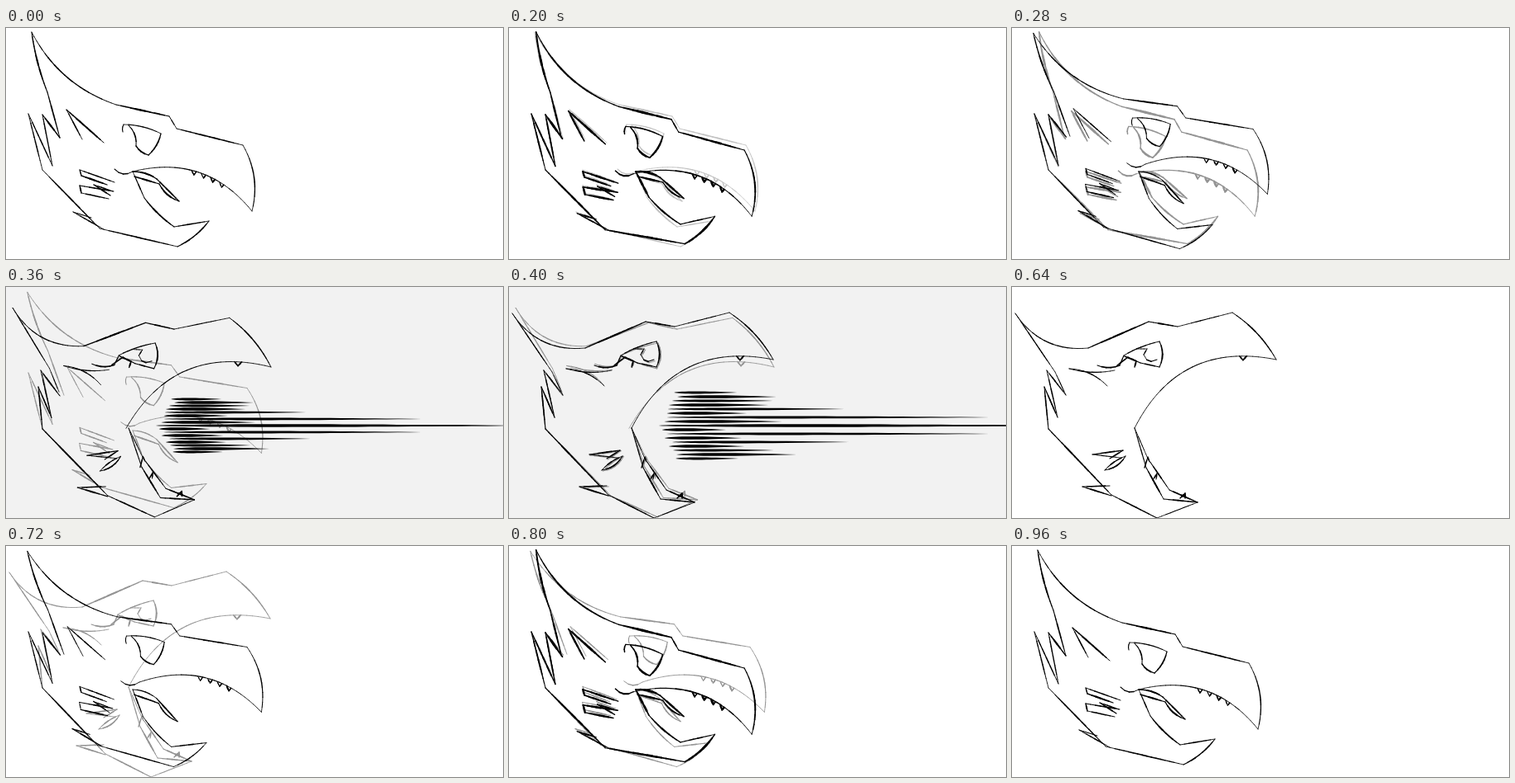
An HTML page with a canvas for the animation above (1.12 s loop, 600 px wide and 280 px high).

```html
<!DOCTYPE html>
<html lang="en">
<head>
<meta charset="utf-8">
<title>Beak beam</title>
<style>
html, body { margin: 0; height: 100%; overflow: hidden; background: #fff; }
canvas { display: block; }
</style>
</head>
<body>
<canvas id="stage" width="600" height="280"></canvas>
<script>
const ctx = document.getElementById('stage').getContext('2d');
const STEP = 40, LOOP = 1120, HUB = 168;

let seed = 1;
const rnd = () => (seed = seed * 16807 % 2147483647) / 2147483647;

// A head is made of chains of key points [x, y, bow of the line leading there].
const closed = {
  pivot: [45, 70], hinge: [153, 174], teeth: [.44, .52, .6, .68],
  upper: [
    [[153, 174], [297, 222, .16], [286, 142, -.1], [206, 122], [197, 107],
      [133, 93], [31, 5, .1], [50, 78, -.03], [65, 133]],
    [[141, 126], [142, 117, .1], [187, 128, .06], [172, 154, .08], [157, 143, .1], [148, 118, -.12]],
    [[131, 171], [153, 174, -.2]]
  ],
  jaw: [
    [[65, 133], [44, 105], [56, 167], [27, 104], [44, 172], [113, 243],
      [207, 265], [245, 234, -.06], [203, 241], [167, 206, .04], [153, 174]],
    [[153, 174], [182, 183, .08], [209, 210], [185, 189, .1], [155, 180]],
    [[118, 244], [81, 223], [103, 230]],
    [[92, 135], [73, 99], [118, 139]],
    [[131, 187], [89, 172], [91, 179], [122, 190]],
    [[130, 198], [89, 191], [91, 200], [124, 207]],
    [[126, 203], [106, 190], [129, 198]]
  ]
};

const open = {
  pivot: [140, 110], hinge: [148, 171], teeth: [.8],
  upper: [
    [[148, 171], [319, 88, .19], [266, 31, -.06], [200, 48], [165, 42],
      [92, 74], [4, 32, .15], [52, 103], [65, 131]],
    [[103, 95], [130, 95, -.1], [135, 83], [178, 66, .04], [178, 97, .12], [155, 92], [140, 85], [127, 95]],
    [[136, 84], [150, 90], [148, 97]],
    [[152, 75], [163, 75], [159, 82], [175, 88, -.3]],
    [[115, 120], [69, 99, -.1], [124, 101, -.06]]
  ],
  jaw: [
    [[65, 131], [42, 101], [55, 158], [39, 121], [44, 172], [120, 252],
      [175, 280], [224, 261], [183, 257], [162, 219], [148, 171]],
    [[148, 171], [164, 208], [190, 246], [224, 261]],
    [[160, 219], [164, 206], [166, 212]],
    [[170, 234], [175, 226], [174, 233]],
    [[203, 256], [209, 250], [209, 256]],
    [[118, 241], [85, 242], [120, 253]],
    [[118, 208], [134, 198], [97, 203], [131, 207]],
    [[137, 205], [112, 222, -.06], [137, 205, -.12]]
  ]
};

// Turns a chain about a point; a bending chain stays still at the neck.
const turn = (chain, [cx, cy], angle, bends) => chain.map(([x, y, bow = 0]) => {
  const a = bends ? angle * Math.max(0, Math.min(1, (x - 45) / 90)) : angle;
  const c = Math.cos(a), s = Math.sin(a);
  return [cx + (x - cx) * c - (y - cy) * s, cy + (x - cx) * s + (y - cy) * c, bow];
});

const curve = ([ax, ay], [bx, by, bow], t) => {
  const lift = 4 * bow * t * (1 - t);
  return [ax + (bx - ax) * t + (by - ay) * lift, ay + (by - ay) * t - (bx - ax) * lift];
};

function pose(head, upper, jaw, weight) {
  const chains = [
    ...head.upper.map(c => turn(c, head.pivot, upper)),
    ...head.jaw.map(c => turn(c, head.hinge, jaw, true))
  ];
  const [a, b] = chains[0];
  for (const t of head.teeth) {
    const tip = curve(a, b, t + .02);
    chains.push([curve(a, b, t), [tip[0], tip[1] + 5, 0], [...curve(a, b, t + .04), 0]]);
  }
  return { chains, weight };
}

const poses = {
  calm: pose(closed, 0, 0, 1.6),
  tense: pose(closed, .025, -.06, 2.2),
  middle: pose(closed, -.08, .05, 1.5),
  lean: pose(open, .05, -.04, 1.5),
  wide: pose(open, 0, 0, 1.5)
};

// Each drawing holds until the next and leaves a short fading trace.
const keys = [['calm', 0], ['tense', 3], ['middle', 7], ['lean', 9],
  ['wide', 10], ['middle', 18], ['tense', 20], ['calm', 21]];

function line(a, b, w) {
  const n = Math.max(3, Math.ceil(Math.hypot(b[0] - a[0], b[1] - a[1]) / 6));
  for (let i = 0; i < n; i++) {
    const taper = .5 + .5 * Math.sin(Math.PI * (i + .5) / n);
    ctx.lineWidth = Math.max(.8, w * taper * (.85 + .3 * rnd()));
    ctx.beginPath();
    ctx.moveTo(...curve(a, b, i / n));
    ctx.lineTo(...curve(a, b, (i + 1) / n));
    ctx.stroke();
  }
}

function drawHead(name, dark) {
  const { chains, weight } = poses[name];
  seed = 77;
  ctx.strokeStyle = `rgb(${Array(3).fill(Math.round(255 * (1 - dark)))})`;
  for (const chain of chains)
    for (let i = 1; i < chain.length; i++) line(chain[i - 1], chain[i], weight * (.7 + .6 * rnd()));
}

function streak(x, y, len, h) {
  ctx.beginPath();
  ctx.moveTo(x, y);
  ctx.bezierCurveTo(x + len * .1, y - h, x + len * .5, y - h, x + len, y);
  ctx.bezierCurveTo(x + len * .5, y + h, x + len * .1, y + h, x, y);
  ctx.fill();
}

// Long and short streaks alternate; the longest lie in the middle.
function blast(grow) {
  seed = 5;
  for (let i = -8; i <= 8; i++) {
    const d = i * 4, long = i % 2 === 0;
    const len = long ? 430 / (1 + (d / 13) ** 2) : 50 + 70 * rnd();
    streak(180 + Math.abs(d) * .6 + 8 * rnd(), HUB + d * grow, len * grow, long ? 1.9 : 2.4);
  }
  streak(180, HUB, 440, 2);
}

function cloud(x, y, len, spread, n) {
  seed = n;
  for (let i = 0; i < n; i++) {
    const off = (rnd() + rnd() - 1) * spread;
    streak(x + len * .35 * rnd(), y + off, len * (.35 + .3 * rnd()), 1.4);
  }
}

function afterglow(fade) {
  ctx.globalAlpha = fade;
  cloud(190, HUB, 140, 14, 45);
  cloud(246, 116, 105, 8, 16);
  cloud(224, 222, 80, 5, 12);
  streak(170, HUB - 3, 280, 2);
  ctx.globalAlpha = Math.min(1, fade * 3.4);
  streak(290, 116.5, 88, 1);
  const glow = ctx.createLinearGradient(168, 0, 345, 0);
  glow.addColorStop(0, '#999');
  glow.addColorStop(1, '#000');
  ctx.fillStyle = glow;
  ctx.fillRect(168, HUB - 1, 432, 2.6);
  ctx.globalAlpha = 1;
}

function draw(step) {
  const flash = step === 9 || step === 10;
  ctx.fillStyle = flash ? '#f2f2f2' : '#fff';
  ctx.fillRect(0, 0, 600, 280);
  ctx.lineCap = 'round';

  const now = keys.findLastIndex(k => k[1] <= step);
  const age = step - keys[now][1];
  if (now > 0 && age < 3) drawHead(keys[now - 1][0], .42 * .75 ** age);
  drawHead(keys[now][0], 1);

  ctx.fillStyle = '#000';
  if (flash) blast(step === 9 ? 1 : 1.25);
  else if (step > 10 && step < 15) afterglow(.55 * .55 ** (step - 11));
}

const start = performance.now();
let shown = -1;
function tick() {
  const step = Math.floor((performance.now() - start) % LOOP / STEP);
  if (step !== shown) draw(shown = step);
  requestAnimationFrame(tick);
}
tick();
</script>
</body>
</html>
```
